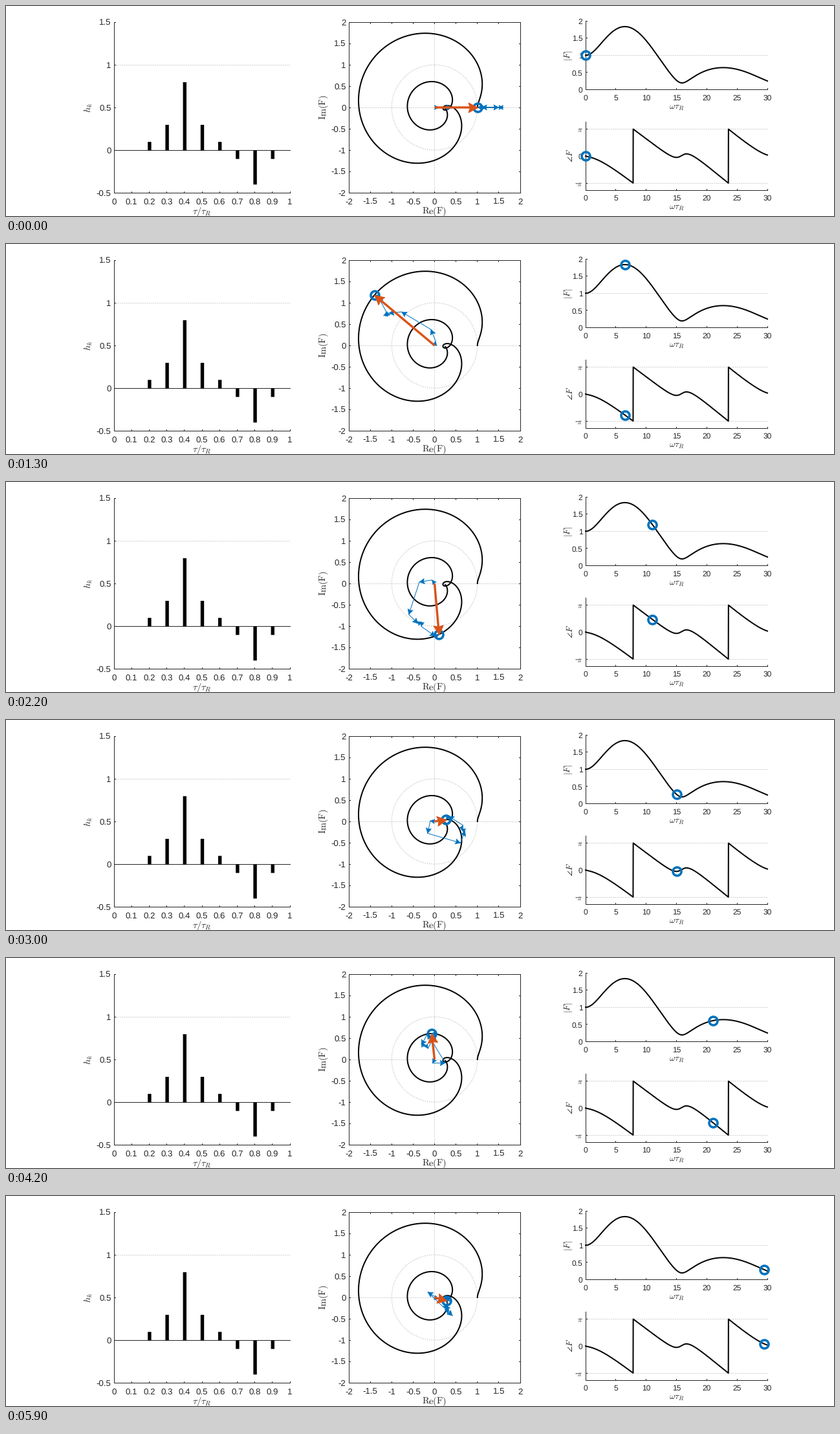
Recreate the animation shown at these times as a matplotlib script. Size 1280 px wide and 325 px high, loop 6 s.

```python
import numpy as np
import matplotlib.pyplot as plt
from matplotlib.animation import FuncAnimation
from matplotlib.collections import PolyCollection

W, H, DPI = 1280, 325, 80
PX = 72 / DPI  # points per pixel
FRAMES, STEP = 60, 0.5
BLUE, ORANGE, INK, DOTS = "#0072BD", "#D95319", "#262626", "#a6a6a6"

plt.rcParams["font.family"] = "Liberation Sans"
plt.rcParams["mathtext.fontset"] = "cm"
plt.rcParams["text.hinting"] = "none"

taps = np.array([0.1, 0.3, 0.8, 0.3, 0.1, -0.1, -0.4, -0.1])
delays = np.arange(2, 10) / 10

fig = plt.figure(figsize=(W / DPI, H / DPI), dpi=DPI, facecolor="white")
stage = fig.add_axes([0, 0, 1, 1])
stage.set_xlim(0, W)
stage.set_ylim(H, 0)
stage.axis("off")


def line(x, y, width=1.0, color=INK, z=2, **style):
    return stage.plot(x, y, lw=width * PX, color=color, zorder=z, snap=False,
                      **style)[0]


def rule(x, y, **style):
    """Thin straight line through pixel centres."""
    line(np.floor(x) + 0.5, np.floor(y) + 0.5, **style)


DOTTED = dict(color=DOTS, z=1, linestyle=(0, (1, 2)), dash_capstyle="butt")


def math_label(x, baseline, text, size, rotation=0):
    stage.text(x, baseline, text, size=size * PX, color=INK, ha="center",
               va="baseline", rotation=rotation, rotation_mode="anchor")


class Panel:
    """A plot area given by its pixel box and data limits."""

    def __init__(self, box, xlim, ylim, size):
        self.left, self.right, self.top, self.bottom = box
        self.xlim, self.ylim, self.size = xlim, ylim, size

    def x(self, v):
        a, b = self.xlim
        return self.left + (np.asarray(v) - a) / (b - a) * (self.right - self.left)

    def y(self, v):
        a, b = self.ylim
        return self.bottom - (np.asarray(v) - a) / (b - a) * (self.bottom - self.top)

    def axes(self, xticks, yticks, label_y, ynames=None, boxed=False):
        l, r, t, b = self.left, self.right, self.top, self.bottom
        rule([l, l], [t, b])
        rule([l, r], [b, b])
        if boxed:
            rule([r, r], [t, b])
            rule([l, r], [t, t])
        shift = 0.345 * self.size
        for v in xticks:
            px = self.x(v)
            rule([px, px], [b, b - 2])
            if boxed:
                rule([px, px], [t, t + 2])
            stage.text(px, label_y + shift, f"{v:g}", size=self.size * PX,
                       color=INK, ha="center", va="baseline")
        for v, name in zip(yticks, ynames or [f"{v:g}" for v in yticks]):
            py = self.y(v)
            rule([l, l + 2], [py, py])
            if boxed:
                rule([r, r - 2], [py, py])
            stage.text(l - 4.5, py + 0.5 + shift, name, size=self.size * PX,
                       color=INK, ha="right", va="baseline")


bars = Panel((167, 439, 25, 289), (0, 1), (-0.5, 1.5), 13.3)
plane = Panel((530, 795, 25, 289), (-2, 2), (-2, 2), 13.3)
gain = Panel((896, 1177, 23, 129.5), (0, 30), (0, 2), 12)
phase = Panel((896, 1177, 179, 285.5), (0, 30), (-4, 4), 12)


def partial_sums(w):
    return np.concatenate([[0], np.cumsum(taps * np.exp(1j * w * delays))])


def response(w):
    return np.exp(1j * np.outer(w, delays)) @ taps


# Impulse response
bars.axes(np.arange(11) / 10, [-0.5, 0, 0.5, 1, 1.5], 302.5)
rule(bars.x([0, 1]), bars.y([1, 1]), **DOTTED)
rule(bars.x([0, 1]), bars.y([0, 0]))
for d, h in zip(delays, taps):
    px = bars.x(d)
    stage.fill_between([px - 2.7, px + 2.7], bars.y(0), bars.y(h),
                       color="black", lw=0, zorder=3, snap=False)
math_label(303, 322.5, r"$\tau/\tau_R$", 14.4)
math_label(131.5, 157, "$h_k$", 14.4, 90)

# Complex plane
halves = np.arange(-4, 5) / 2
plane.axes(halves, halves, 302.5, boxed=True)
rule(plane.x([-2, 2]), plane.y([0, 0]), **DOTTED)
rule(plane.x([0, 0]), plane.y([-2, 2]), **DOTTED)
turn = np.linspace(0, 2 * np.pi, 181)
line(plane.x(np.cos(turn)), plane.y(np.sin(turn)), **DOTTED)
math_label(662.5, 322.5, r"$\mathrm{Re(F)}$", 14.4)
math_label(495, 156.5, r"$\mathrm{Im(F)}$", 14.4, 90)

# Magnitude and phase
sweep = np.arange(0, 31, 5)
gain.axes(sweep, [0, 0.5, 1, 1.5, 2], 141.5)
phase.axes(sweep, [-np.pi, 0, np.pi], 296.5, ["-$\\pi$", "0", "$\\pi$"])
rule(gain.x([0, 30]), gain.y([1, 1]), **DOTTED)
for level in (-np.pi, np.pi):
    rule(phase.x([0, 30]), phase.y([level, level]), **DOTTED)
math_label(1037, 159.5, r"$\omega\tau_R$", 13.4)
math_label(1037, 314.5, r"$\omega\tau_R$", 13.4)
math_label(873, 76.5, "$|F|$", 13.4, 90)
math_label(876, 231.5, r"$\angle F$", 13.4, 90)

omega = np.linspace(0, 30, 1501)
curve = response(omega)
line(plane.x(curve.real), plane.y(curve.imag), 2, "black", 4)
line(gain.x(omega), gain.y(np.abs(curve)), 2, "black", 4)
line(phase.x(omega), phase.y(-np.angle(curve)), 2, "black", 4)

# Moving parts
rings = line([], [], 0, BLUE, 5, marker="o", ms=13 * PX, mfc="none",
             mec=BLUE, mew=3.6 * PX)
chain = line([], [], 1, BLUE, 6)
total = line([], [], 3.4, ORANGE, 8, solid_capstyle="butt")


def head_shapes(color, edge, z):
    shapes = PolyCollection([], facecolors=color, edgecolors=color,
                            linewidths=edge * PX, zorder=z)
    stage.add_collection(shapes, autolim=False)
    return shapes


chain_heads = head_shapes(BLUE, 0.5, 7)
total_head = head_shapes(ORANGE, 1.2, 9)


def arrow_head(start, tip, size):
    """Notched head, never longer than its arrow; second point is the notch."""
    span = np.hypot(*(tip - start))
    size = min(size, span)
    u = (tip - start) / span
    n = np.array([-u[1], u[0]]) * size * 0.53
    back = tip - u * size
    return np.array([back + n, back + u * size * 0.15, back - n, tip])


def update(i):
    w = i * STEP
    sums = partial_sums(w)
    end = sums[-1]
    pts = np.column_stack([plane.x(sums.real), plane.y(sums.imag)])
    rings.set_data([pts[-1, 0], gain.x(w), phase.x(w)],
                   [pts[-1, 1], gain.y(abs(end)), phase.y(-np.angle(end))])
    chain.set_data(pts[:, 0], pts[:, 1])
    chain_heads.set_verts([arrow_head(a, b, 8) for a, b in zip(pts, pts[1:])])
    head = arrow_head(pts[0], pts[-1], 14)
    total.set_data([pts[0, 0], head[1, 0]], [pts[0, 1], head[1, 1]])
    total_head.set_verts([head])
    return rings, chain, chain_heads, total, total_head


anim = FuncAnimation(fig, update, frames=FRAMES, interval=100, repeat=True,
                     repeat_delay=0, blit=False)
plt.show()
```
